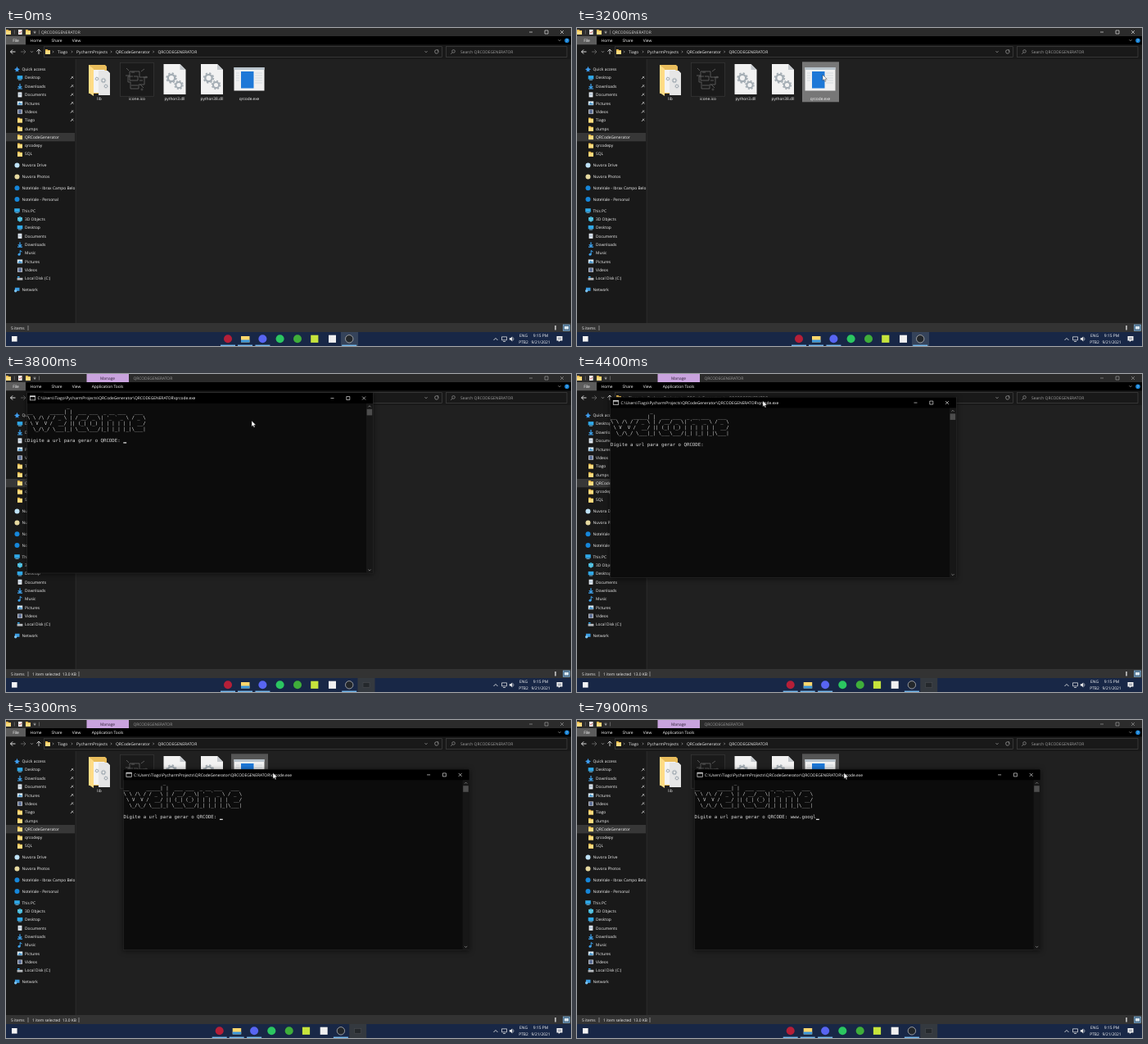
Recreate the animation shown at these times as an HTML page. Size 690 by 388 pixels, loop 8000 ms.

```html
<!DOCTYPE html>
<html lang="en">
<head>
<meta charset="utf-8">
<title>Console launch</title>
<style>
html, body { margin: 0; width: 100%; height: 100%; overflow: hidden; background: #202020; }
svg { display: block; width: 690px; height: 388px; }
text { font-family: "Open Sans", "Noto Sans", sans-serif; font-weight: 500; white-space: pre; text-rendering: geometricPrecision; }
.mono { font-family: "DejaVu Sans Mono", "Noto Sans Mono", monospace; font-weight: 400; font-size: 5.73px; fill: #ddd; }
#console { filter: drop-shadow(0 1.5px 3px rgba(0, 0, 0, .6)); }
</style>
</head>
<body>
<svg id="stage" viewBox="0 0 690 388"></svg>
<script>
const LOOP = 8000, CELL = 3.45, ROW = 6.9, CLIENT = 12.9;
const PROMPT = 'Digite a url para gerar o QRCODE: ';
const USER = 'Tiago';
const PATH = `C:\\Users\\${USER}\\PycharmProjects\\QRCodeGenerator\\QRCODEGENERATOR\\qrcode.exe`;
const ART = [
  "              _",
  "__      _____| |  ___ ___  _ __ ___   ___",
  "\\ \\ /\\ / / _ \\ | / __/ _ \\| '_ ` _ \\ / _ \\",
  " \\ V  V /  __/ || (_| (_) | | | | | |  __/",
  "  \\_/\\_/ \\___|_| \\___\\___/|_| |_| |_|\\___|"
];

// Markup helpers; text is placed by its vertical centre
const rect = (x, y, w, h, fill, more = '') => `<rect x="${x}" y="${y}" width="${w}" height="${h}" fill="${fill}" ${more}/>`;
const disc = (x, y, r, fill, more = '') => `<circle cx="${x}" cy="${y}" r="${r}" fill="${fill}" ${more}/>`;
const line = (d, stroke = '#ddd', w = .7) => `<path d="${d}" fill="none" stroke="${stroke}" stroke-width="${w}"/>`;
const shape = (d, fill) => `<path d="${d}" fill="${fill}"/>`;
const text = (x, y, s, fill = '#f4f4f4', anchor = 'start', size = 4.88) =>
  `<text x="${x}" y="${y + 1.75}" fill="${fill}" text-anchor="${anchor}" font-size="${size}">${s}</text>`;
const group = (id, body) => `<g id="${id}">${body}</g>`;

const folder = (x, y) => shape(`M${x - 3} ${y - 3}h2.5l1 1h2.5v5h-6z`, '#e8b84a') + rect(x - 3, y - 1.2, 6, 4.2, '#ffdc80');
const buttons = (x, y, gap) =>
  line(`M${x - 2} ${y}h4M${x + gap - 2} ${y - 2}h4v4h-4zM${x + 2 * gap - 2} ${y - 2}l4 4m0-4l-4 4`, '#e8e8e8', .65);
const down = (x, y) => line(`M${x - 1.5} ${y - .8}l1.5 1.6l1.5-1.6`, '#bbb', .6);
const right = (x, y) => line(`M${x - .6} ${y - 1.3}l1.3 1.3l-1.3 1.3`, '#bbb', .6);

function sideIcon(kind, x, y) {
  switch (kind) {
    case 'folder': return folder(x, y);
    case 'star': return shape(`M${x - 3.5} ${y}l2.5-1l1-2.5l1 2.5l2.5 1l-2 1.2l.3 2.3l-1.8-1.4l-1.8 1.4l.3-2.3z`, '#3f9df0');
    case 'screen': return rect(x - 3.3, y - 2.6, 6.6, 4.4, '#2fa8e8') + rect(x - 2, y + 2.1, 4, .8, '#8ccdf0');
    case 'down': return line(`M${x} ${y - 3}v5m-2.2-2l2.2 2.2l2.2-2.2M${x - 3} ${y + 3}h6`, '#3fa4f0', 1.2);
    case 'page': return rect(x - 2.4, y - 3, 4.8, 6, '#e8eef4') + line(`M${x - 1.4} ${y - 1}h2.8m-2.8 1.5h2.8`, '#6d8ca8', .6);
    case 'picture': return rect(x - 3.2, y - 2.4, 6.4, 4.8, '#dcecf8') + shape(`M${x - 2.6} ${y + 1.8}l2-3l1.5 1.6l1-1l1 2.4z`, '#3d8fc8');
    case 'video': return rect(x - 3, y - 2.7, 6, 5.4, '#b8bcc4') + rect(x - 1.8, y - 2, 3.6, 4, '#5a6e96');
    case 'cube': return shape(`M${x - 3} ${y - 1.6}l3-1.6l3 1.6v3.4l-3 1.6l-3-1.6z`, '#3cb4d8') + line(`M${x - 3} ${y - 1.6}l3 1.6l3-1.6M${x} ${y}v3.4`, '#bfeaf6', .5);
    case 'note': return disc(x - 1, y + 1.8, 1.5, '#3fa4f0') + line(`M${x + .2} ${y + 1.8}v-4.8l2.4 1.6`, '#3fa4f0', 1);
    case 'disk': return rect(x - 3.4, y - .8, 6.8, 2.8, '#b8bcc0') + rect(x - 3, y - 2.6, 2.6, 1.6, '#38a8ec');
    case 'net': return rect(x - 2.6, y - 2.6, 5.6, 4, '#3a9be0') + disc(x - 1.8, y + 1.4, 1.7, '#7cc4f2');
    default: return disc(x, y, 3, kind);
  }
}

// name, centre line, icon, indented, pinned
const SIDE = [
  ['Quick access', 50.3, 'star'],
  ['Desktop', 60.7, 'screen', 1, 1], ['Downloads', 71, 'down', 1, 1], ['Documents', 81.4, 'page', 1, 1],
  ['Pictures', 91.8, 'picture', 1, 1], ['Videos', 102.1, 'video', 1, 1], [USER, 112.4, 'folder', 1, 1],
  ['dumps', 122.8, 'folder', 1], ['QRCodeGenerator', 133.1, 'folder', 1], ['qrcodepy', 143.4, 'folder', 1], ['SQL', 153.7, 'folder', 1],
  ['Nuvora Drive', 167.6, '#bfe2f6'], ['Nuvora Photos', 181.4, '#e6d9a0'],
  ['NoteVale - Ibrax Campo Belo', 195.2, '#1686d9'], ['NoteVale - Personal', 209, '#1686d9'],
  ['This PC', 222.8, 'screen'],
  ['3D Objects', 233.2, 'cube', 1], ['Desktop', 243.5, 'screen', 1], ['Documents', 253.8, 'page', 1], ['Downloads', 264.2, 'down', 1],
  ['Music', 274.5, 'note', 1], ['Pictures', 284.9, 'picture', 1], ['Videos', 295.2, 'video', 1], ['Local Disk (C:)', 305.6, 'disk', 1],
  ['Network', 319.4, 'net']
];

const sidebar = () => rect(0, 128, 84, 10.3, '#373737') + SIDE.map(([name, y, icon, inset, pin]) =>
  sideIcon(icon, inset ? 17 : 13.5, y) + text(inset ? 23 : 19.5, y, name) +
  (pin ? line(`M80 ${y - 1.6}l2.6 2.4m-.4-2.6l-2.6 2.8m1.2-1.4l-2 2`, '#b4b4b4', .8) : '')).join('') +
  rect(84.5, 38, 606, 322, '#202020') + rect(84.8, 38, .7, 322, '#2e2e2e');

const gear = (x, y, r) => disc(x, y, r, 'none', `stroke="#a4adb4" stroke-width="${r * .55}"`) +
  disc(x, y, r * 1.4, 'none', `stroke="#a4adb4" stroke-width="${r * .4}" stroke-dasharray="${r * .55}"`);
const dll = x => shape(`M${x - 13.5} 44h20l7 7v30h-27z`, '#f2f2f2') + shape(`M${x + 6.5} 44l7 7h-7z`, '#c4c8cc') + gear(x - 4, 61, 4.2) + gear(x + 5, 69.5, 3.6);
const libFolder = () => shape('M101 45h20l2 2v33h-22z', '#e9bd5c') +
  shape('M106 51h14l3 3v25h-17z', '#f4f4f4') + shape('M113 52h11l3 3v27h-14z', '#e6e6e6') +
  gear(111, 62, 1.6) + gear(119, 64, 2) + gear(122, 71, 1.7) + shape('M101 45l6 5v33l-6-4z', '#ffdc85');
const iconFile = () => rect(139.5, 42.3, 41, 41, '#1a1a1a', 'stroke="#383838" stroke-width=".7"') +
  line('M151 53h12v7h6v9h-7v5h-10v-8h-3v-7h6m-4-6v11h10v-5h-5m-3 11h8m-8-16h4m6 10h4m-16-6h-5m22 2h5m-9 9l4 4m-18-21l-3-3m18 4l4-3', '#666', .8) +
  disc(171, 60, 1, 'none', 'stroke="#666" stroke-width=".6"') + disc(166, 75, 1, 'none', 'stroke="#666" stroke-width=".6"');
const program = () => rect(278.5, 48, 37, 28.5, '#f0f0f0') + rect(278.5, 48, 37, 3, '#b9c4cc') +
  rect(287, 53, 15.5, 20.5, '#1d78d7') +
  line('M281 55h4m-4 3h4m-4 3h4m-4 3h4m19-9h9m-9 3h9m-9 3h9m-9 3h9m-9 3h9', '#bfc9d1', .6);
const label = (x, s) => text(x, 86.3, s, '#f4f4f4', 'middle', 4.8);
const files = () => libFolder() + label(114, 'lib') + iconFile() + label(160, 'icone.ico') +
  dll(206) + label(206, 'python3.dll') + dll(251.5) + label(251.5, 'python38.dll') +
  rect(275, 41.3, 45, 49, '#4d4d4d', 'id="tile"') + program() + label(297, 'qrcode.exe');

const header = () => rect(0, 0, 690, 10, '#2b2b2b') + rect(0, 10, 690, 10.3, '#000') + rect(0, 10, 24, 10.3, '#5c5c5c') +
  folder(3, 5) + line('M10.3 2.5v5M40.5 2.5v5', '#999', .5) + rect(15, 2, 4.6, 6, '#eee') + line('M16 5l1 1.3l2-2.5', '#d04a4a', .7) +
  folder(27, 5) + line('M33.5 4.2h3', '#ccc', .6) + shape('M33.7 5.2h2.8l-1.4 1.5z', '#ccc') +
  [[12, 'File'], [36.5, 'Home'], [62, 'Share'], [86, 'View']].map(([x, s]) => text(x, 15.2, s, '#fff', 'middle')).join('') +
  group('title', text(43, 5, 'QRCODEGENERATOR', '#d6d6d6')) +
  group('manage', rect(98.5, 0, 51.5, 10, '#c9a3de') + text(124, 5, 'Manage', '#2c2033', 'middle') + text(124, 15.2, 'Application Tools', '#fff', 'middle')) +
  group('controls', buttons(641, 5, 19)) + down(676, 15) + disc(685, 15.2, 2.8, '#1683d8') + text(685, 15.2, '?', '#fff', 'middle', 4.5);

const addressBar = () => line('M5.5 29h6m-6 0l2.6-2.6m-2.6 2.6l2.6 2.6', '#f0f0f0', .9) +
  line('M18 29h6m0 0l-2.6-2.6m2.6 2.6l-2.6 2.6', '#707070', .8) + down(31.5, 29) +
  line('M40 32v-6m-2.6 2.6l2.6-2.6l2.6 2.6', '#f0f0f0', .8) +
  rect(46.5, 22.7, 486, 12.6, '#191919', 'stroke="#4a4a4a" stroke-width=".6"') + folder(51, 29) +
  [57.5, 80.5, 128.5, 180].map(x => right(x, 29)).join('') +
  text(63, 29, USER) + text(86, 29, 'PycharmProjects') + text(134, 29, 'QRCodeGenerator') + text(185.5, 29, 'QRCODEGENERATOR') +
  down(513, 29) + line('M527.6 27.6a2.2 2.2 0 1 1-1.8-.9m0 0h1.9v1.9', '#bbb', .6) +
  rect(537.5, 22.7, 147.5, 12.6, '#191919', 'stroke="#4a4a4a" stroke-width=".6"') +
  disc(546.5, 28.4, 1.8, 'none', 'stroke="#aaa" stroke-width=".6"') + line('M545.2 29.8l-2 2', '#aaa', .6) +
  text(555, 29, 'Search QRCODEGENERATOR', '#a2a2a2');

const statusBar = () => rect(0, 360, 690, 11, '#333') + text(6, 365.8, '5 items') + line('M27 363v6', '#ddd', .5) +
  group('selected', text(32, 365.8, '1 item selected  13.0 KB') + line('M89 363v6', '#ddd', .5)) +
  line('M671 363v5.5', '#ddd', 1.4) + rect(680.5, 362, 8, 7.5, '#4d6f8c', 'stroke="#8cc0e8" stroke-width=".6"') + rect(682, 364, 5, 3.5, '#dceaf4');

const underline = x => rect(x - 9, 386.6, 18, 1.4, '#76b9ed');
const taskbar = () => rect(0, 371, 690, 17, '#182746') + rect(7, 376, 6.6, 6.6, '#f4f4f4') +
  group('apps',
    rect(409, 371, 21, 17, '#35435a', 'id="recorder"') +
    group('consoleApp', rect(429.5, 371, 21, 17, '#34393f') + rect(436, 376.5, 8, 6, '#24282c', 'stroke="#484c50" stroke-width=".6"')) +
    disc(271, 379.3, 5, '#b51f38') + rect(287, 376, 10.5, 7.5, '#ffd76c') + rect(287, 380.5, 10.5, 3, '#3a96dc') +
    disc(313.4, 379.3, 5, '#5865f2') + disc(334.6, 379.3, 5, '#2bc661') + disc(356, 379.3, 5, '#3fae3a') +
    rect(372.2, 374.7, 9.2, 9.2, '#c6e43c') + rect(394, 374.7, 9, 9.2, '#f0f0f0') +
    disc(419.2, 379.3, 4.7, '#23272b', 'stroke="#c8c8c8" stroke-width=".7"') +
    [271, 292, 313.4, 419.2].map(underline).join('')) +
  line('M595.5 381l2.5-2.6l2.5 2.6', '#eee', .8) +
  line('M605.5 376.8h6v4h-6zM607 382.5h3', '#eee', .7) +
  shape('M614.8 378.2h1.5l2-1.8v6l-2-1.8h-1.5z', '#eee') + line('M619.3 377.6q1.4 1.8 0 3.6', '#eee', .6) +
  text(632, 375.4, 'ENG', '#fff', 'middle') + text(632, 383.2, 'PTB2', '#fff', 'middle') +
  text(653, 375.4, '9:15 PM', '#fff', 'middle') + text(653, 383.2, '9/21/2021', '#fff', 'middle') +
  shape('M672.5 376h7v5.5h-3l-1.6 1.8v-1.8h-2.4z', '#f2f2f2') + line('M674 378h4m-4 1.6h4', '#182746', .5);

const baseline = row => CLIENT + 5.2 + ROW * row;
const mono = (row, s, more = '') => `<text class="mono" x="0" y="${baseline(row)}" ${more}>${s}</text>`;
const consoleWindow = () => rect(-.3, 0, 422.6, 220, '#0c0c0c', 'stroke="#303030" stroke-width=".5"') + rect(0, 0, 422, CLIENT, '#000') +
  rect(3.3, 3.9, 6.4, 5, '#111', 'stroke="#ddd" stroke-width=".7"') + rect(3.3, 3.7, 6.4, 1.3, '#ddd') +
  text(12.5, 6.5, PATH, '#fff') + buttons(372.5, 6.5, 19.3) +
  rect(414, CLIENT, 8, 207, '#171717') + rect(414.6, 19.8, 6.6, 7.6, '#4d4d4d') +
  line('M416.4 17.3l1.6-1.6l1.6 1.6M416.4 215.5l1.6 1.6l1.6-1.6', '#999', .7) +
  group('output', ART.map((s, row) => mono(row, s)).join('') + mono(6, '', 'id="prompt"') +
    rect(0, baseline(6) + .8, CELL + .4, 1.2, '#eee', 'id="caret"'));

stage.innerHTML = rect(0, 0, 690, 388, '#191919') + sidebar() + files() + header() + addressBar() + statusBar() + taskbar() +
  group('console', consoleWindow()) +
  group('mouse', '<path d="M0 0v7.2l1.7-1.5l1.1 2.6l1.2-.5l-1.1-2.5h2.3z" fill="#fff" stroke="#111" stroke-width=".4"/>');

// Motion keys: time, x, y
const MOUSE = [[1400, 663, 202], [1600, 590, 166], [1900, 380, 88], [2200, 301, 61], [2300, 300, 57], [4000, 300, 57], [4300, 211, 27], [4700, 274, 49.5], [4900, 326, 64.5]];
const DRAG = [[4300, 26, 23], [4700, 85.3, 45], [4900, 143.6, 60.4]];
const KEYS = [5600, 5850, 6100, 7000, 7200, 7400, 7500, 7700, 7800];
const TYPED = 'www.googl';

const el = id => document.getElementById(id);
const show = (id, on) => el(id).setAttribute('visibility', on ? 'visible' : 'hidden');
const fade = (id, opacity) => el(id).setAttribute('opacity', opacity);
const move = (id, [x, y]) => el(id).setAttribute('transform', `translate(${x} ${y})`);
const clamp = v => Math.max(0, Math.min(1, v));

function along(keys, t) {
  const i = keys.findIndex(k => k[0] > t);
  if (i === 0) return keys[0].slice(1);
  if (i < 0) return keys[keys.length - 1].slice(1);
  const [a, b] = [keys[i - 1], keys[i]], p = (t - a[0]) / (b[0] - a[0]);
  return [1, 2].map(n => a[n] + (b[n] - a[n]) * p);
}

function draw(t) {
  const opened = t >= 3500, managed = t >= 3400;
  show('mouse', t >= 1400);
  move('mouse', along(MOUSE, t));
  show('tile', t >= 2100);
  el('tile').setAttribute('fill', t < 3200 ? '#4d4d4d' : opened ? '#555' : '#777');

  show('manage', managed);
  show('selected', managed);
  move('title', [managed ? 112.5 : 0, 0]);
  fade('title', opened ? .65 : 1);
  fade('controls', opened ? .6 : 1);

  show('recorder', !opened);
  show('consoleApp', opened);
  move('apps', [-10.3 * clamp((t - 3900) / 200), 0]);

  show('console', opened);
  fade('console', clamp((t - 3400) / 200));
  move('console', along(DRAG, t));

  const count = KEYS.filter(k => k <= t).length;
  const blinkOff = t >= 4300 && t < 5000 || t >= 6700 && t < 7000;
  fade('output', t >= 3700 ? 1 : 0);
  el('prompt').textContent = PROMPT + TYPED.slice(0, count);
  el('caret').setAttribute('x', (PROMPT.length + count) * CELL);
  fade('caret', blinkOff ? 0 : 1);
}

const start = performance.now();
function frame() {
  draw((performance.now() - start) % LOOP);
  requestAnimationFrame(frame);
}
frame();
</script>
</body>
</html>
```
